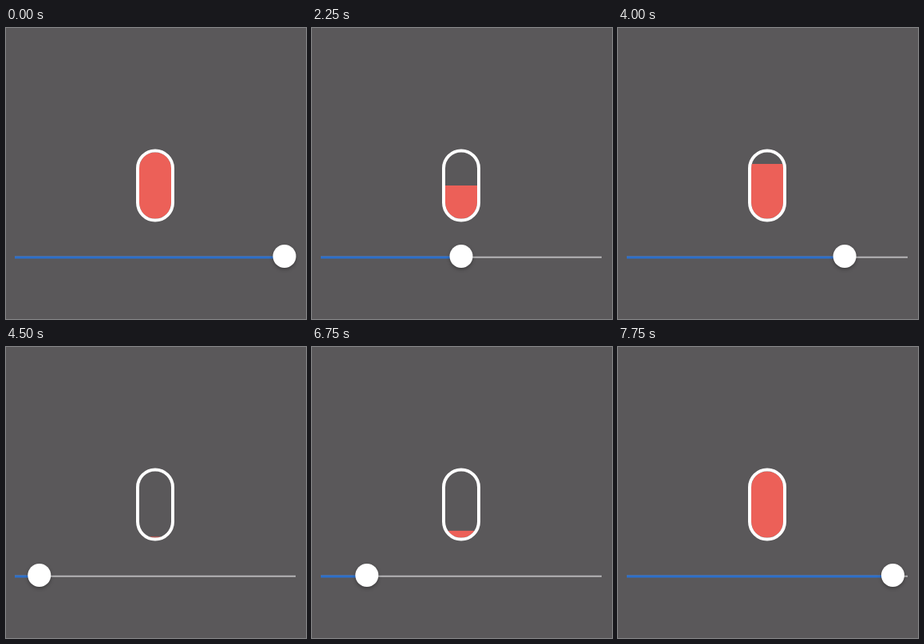
These frames come from a looping animation (376x364 px, 8000 ms). An HTML page:

```html
<!DOCTYPE html>
<html lang="en">
<head>
<meta charset="utf-8">
<title>Slider and capsule</title>
<style>
  html, body { margin: 0; height: 100%; overflow: hidden; background: #5a585a; }
  svg { display: block; width: 100vw; height: 100vh; }
  #capsule { filter: blur(.4px); }
  #knob { filter: drop-shadow(0 2px 2px rgba(0, 0, 0, .3)); }
</style>
</head>
<body>
<svg viewBox="0 0 376 364">
  <clipPath id="inside"><rect x="167" y="155.5" width="40" height="83" rx="20"/></clipPath>
  <g id="capsule">
    <rect id="fill" x="163" width="48" fill="#ec6058" clip-path="url(#inside)"/>
    <rect x="165" y="153.5" width="44" height="87" rx="22" fill="none" stroke="#fff" stroke-width="4"/>
  </g>
  <path d="M11 286.7H363" stroke="#b5b4b6" stroke-width="2"/>
  <path id="done" stroke="#2c6fca" stroke-width="3"/>
  <circle id="knob" cy="285.6" r="14.5" fill="#fff"/>
</svg>
<script>
  const LOOP = 8000, STEP = 250, MIN = 25, MAX = 349;
  // Each drag: start, end, level reached
  const drags = [
    [400, 1000, .5],
    [3250, 3750, 1],
    [3750, 4620, 0],
    [6420, 7850, 1]
  ];
  const [fill, done, knob] = ['fill', 'done', 'knob']
    .map(id => document.getElementById(id));

  function ease(t, from, to) {
    const u = Math.min(1, Math.max(0, (t - from) / (to - from)));
    return u * u * (3 - 2 * u);
  }

  function levelAt(t) {
    return drags.reduce((level, [from, to, goal]) =>
      level + (goal - level) * ease(t, from, to), 1);
  }

  function draw(now) {
    const t = Math.floor(now % LOOP / STEP) * STEP;
    const level = levelAt(t);
    const x = MIN + (MAX - MIN) * level;
    fill.setAttribute('y', 242 - 90 * level);
    fill.setAttribute('height', 90 * level);
    done.setAttribute('d', `M11 287H${x}`);
    knob.setAttribute('cx', x);
  }

  const start = performance.now();
  function loop() {
    draw(performance.now() - start);
    requestAnimationFrame(loop);
  }
  loop();
</script>
</body>
</html>
```
